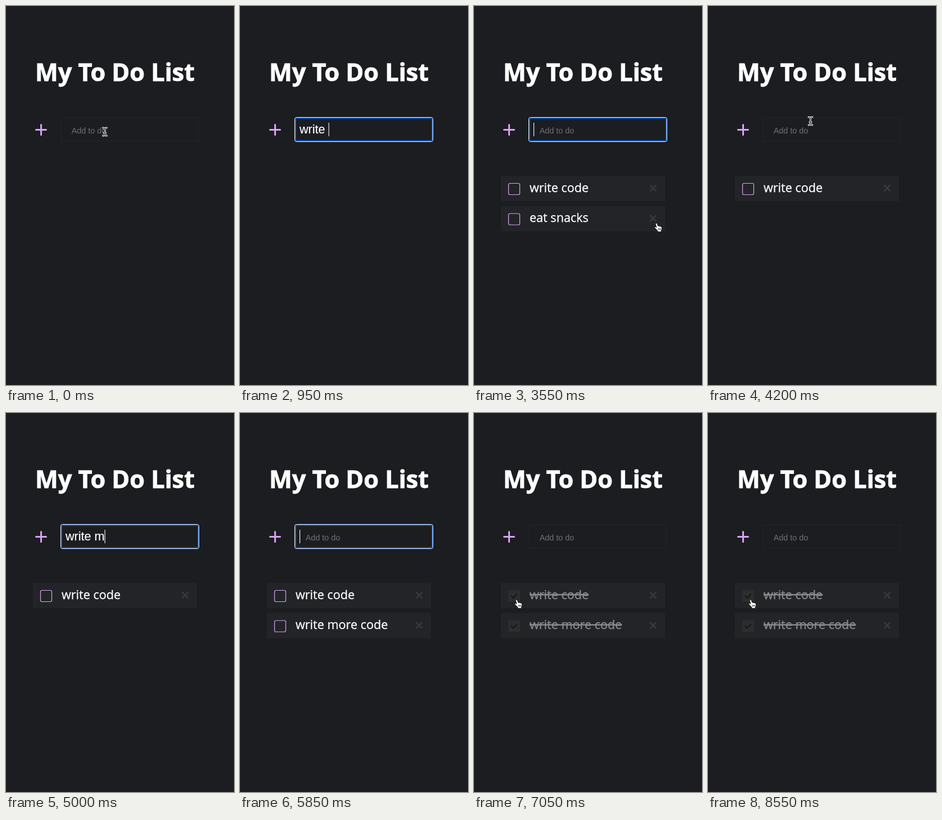
An HTML page for the animation above (8.75 s loop, 406 by 672 pixels).

```html
<!DOCTYPE html>
<html lang="en">
<head>
<meta charset="utf-8">
<title>To do list</title>
<style>
  html, body { margin: 0; width: 100%; height: 100%; overflow: hidden; background: #1c1d20; }
  svg { display: block; width: 406px; height: 672px; }
  text { white-space: pre; fill: #fff; }
  .title { font: 700 43.2px "Open Sans", sans-serif; text-anchor: middle; stroke: #fff; stroke-width: .9; }
  .label { font: 400 21.6px "Open Sans", sans-serif; stroke: #fff; stroke-width: .3; }
  .typed { font: 400 21.6px "Liberation Sans", Arial, sans-serif; stroke: #fff; stroke-width: .2; }
  .hint { font: 400 14.4px "Liberation Sans", Arial, sans-serif; fill: #707072; }
  .done .label { fill: #8b8b8d; stroke: #8b8b8d; text-decoration: line-through; text-decoration-thickness: 1.6px; }
  .line { fill: none; stroke-linecap: round; stroke-linejoin: round; }
</style>
</head>
<body>
<svg viewBox="0 0 406 672">
  <defs>
    <g id="row">
      <rect x="48" width="292" height="45" fill="#232427"/>
      <path d="M313.5 16.5l11 11m0 -11l-11 11" stroke="#38393c" stroke-width="2.5"/>
    </g>
    <rect id="open" x="61.5" y="13.5" width="20" height="20" rx="2.5" fill="none" stroke="#d9a3f7" stroke-width="1.2"/>
    <g id="checked">
      <rect x="61" y="13" width="21" height="21" rx="2.5" fill="#2c2d2d"/>
      <path class="line" d="M66.5 23.5l3.5 3.5 6.5 -7" stroke="#151617" stroke-width="2"/>
    </g>
    <path id="beam" class="line" d="M-3.4 -7Q0 -7 0 -4.6Q0 -7 3.4 -7M0 -4.6V4.6M-3.4 7Q0 7 0 4.6Q0 7 3.4 7M-1.6 2H1.6"/>
  </defs>

  <rect width="406" height="672" fill="#1c1d20"/>
  <text class="title" x="194" y="133">My To Do List</text>
  <path class="line" d="M53.5 219.5H71.5M62.5 210.5V228.5" stroke="#d9a3f7" stroke-width="3"/>
  <rect x="98.5" y="198.5" width="244" height="41" fill="none" stroke="#242528"/>
  <g id="ring" fill="none">
    <rect x="97.5" y="197.5" width="246" height="43" rx="3" stroke="#fff"/>
    <rect x="99" y="199" width="243" height="40" rx="2" stroke="#0b57c8" stroke-width="2"/>
  </g>
  <text class="hint" id="hint" x="116.7" y="226">Add to do</text>
  <text class="typed" id="typed" x="106" y="226"></text>
  <rect id="caret" y="207" width="1.1" height="24" fill="#fff"/>
  <g id="list"></g>
  <g id="pointer">
    <g id="text-pointer">
      <use href="#beam" stroke="#fff" stroke-width="2.8"/>
      <use href="#beam" stroke="#111" stroke-width="1"/>
    </g>
    <path id="hand-pointer" d="M-1.8 1.2Q-1.2 -.6 .6 .3Q1.4 .8 2.6 5.2Q4.2 4.2 5 5.6Q6.5 4.8 7.2 6.2Q9.4 5.6 9.5 8.2Q9.8 11 8.4 13V15.2H2V13.6Q.3 12 -2.8 8.6Q-4 6.9 -2.6 6.4Q-1.4 6.2 0 7.8Z
      M3.2 9.3V12.2M5.1 9.1V12.2M7 9V12.2" fill="#fff" stroke="#111" stroke-width=".9" stroke-linejoin="round"/>
    <path id="arrow-pointer" d="M0 0V14.5L3.4 11.3 5.6 16.3 8.2 15.2 6 10.4H10.6Z" fill="#111" stroke="#fff" stroke-width="1.1" stroke-linejoin="round"/>
  </g>
</svg>
<script>
  const LOOP = 8750, STEP = 50, PITCH = 53.5;
  const $ = id => document.getElementById(id);
  const show = (id, on) => { $(id).style.display = on ? "" : "none"; };

  // Keys are pressed at an even pace from the first to the last character.
  const entries = [
    { text: "write code", first: 400, last: 1300, enter: 1450, finished: 6350 },
    { text: "eat snacks", first: 1800, last: 2950, enter: 3150, removed: 3700 },
    { text: "write more code", first: 4500, last: 5650, enter: 5850, finished: 7000 },
  ];
  const focusSpans = [{ from: 50, to: 3700 }, { from: 4300, to: 6350 }];

  const spots = {
    rest: { x: 176, y: 223 },
    input: { x: 182.5, y: 204 },
    remove: { x: 325, y: 385 },
    aside: { x: 393, y: 398 },
    upperBox: { x: 76, y: 331 },
    lowerBox: { x: 76, y: 383 },
  };
  // The pointer shows during each stroke and eases from spot to spot.
  const strokes = [
    { from: 0, to: 150, origin: "rest", moves: [] },
    { from: 3350, to: 4500, origin: "rest", moves: [
      { from: 3350, to: 3550, spot: "remove" },
      { from: 3700, to: 3850, spot: "aside" },
      { from: 3850, to: 4200, spot: "input" },
    ] },
    { from: 5900, to: LOOP, origin: "input", moves: [
      { from: 5900, to: 6250, spot: "upperBox" },
      { from: 6400, to: 6550, spot: "lowerBox" },
      { from: 6700, to: 6900, spot: "upperBox" },
    ] },
  ];

  const during = (t, span) => t >= span.from && t < span.to;

  function progress(t, { from, to }) {
    const k = Math.min(1, Math.max(0, (t - from) / (to - from)));
    return k * k * (3 - 2 * k);
  }

  function pointerAt(t, { origin, moves }) {
    return moves.reduce((p, move) => {
      const k = progress(t, move), goal = spots[move.spot];
      return { x: p.x + (goal.x - p.x) * k, y: p.y + (goal.y - p.y) * k };
    }, spots[origin]);
  }

  function pointerKind({ x, y }) {
    if (x > 97 && x < 344 && y > 197 && y < 241) return "text";
    const overControl = (x > 60 && x < 83) || (x > 309 && x < 329);
    return overControl && y > 300 && y < 405 ? "hand" : "arrow";
  }

  function row(text, y, done) {
    return `<g class="${done ? "done" : ""}" transform="translate(0 ${y})"><use href="#row"/>
      <use href="#${done ? "checked" : "open"}"/>
      <text class="label" x="99" y="28.8">${text}</text></g>`;
  }

  let listMarkup = "";
  function drawList(t) {
    const live = entries.filter(e => t >= e.enter && !(t >= e.removed));
    const done = live.filter(e => t >= e.finished);
    const todo = live.filter(e => !done.includes(e));
    const gap = todo.length ? 9 : 0;
    const markup = [...todo, ...done].map((e, i) => {
      const isDone = done.includes(e);
      return row(e.text, 301 + PITCH * i + (isDone ? gap : 0), isDone);
    }).join("");
    if (markup !== listMarkup) $("list").innerHTML = listMarkup = markup;
  }

  function typedText(t) {
    const entry = entries.find(e => t >= e.first && t < e.enter);
    if (!entry) return "";
    const { text, first, last } = entry;
    const pace = (last - first) / (text.length - 1);
    return text.slice(0, 1 + Math.floor((t - first) / pace));
  }

  function drawInput(t) {
    const text = typedText(t);
    const focused = focusSpans.some(span => during(t, span));
    $("typed").textContent = text.replaceAll(" ", "\u00a0");
    $("caret").setAttribute("x", 106 + (text ? $("typed").getComputedTextLength() : 0));
    show("hint", !text);
    show("ring", focused);
    show("caret", focused);
  }

  function drawPointer(t) {
    const stroke = strokes.find(s => during(t, s));
    show("pointer", stroke);
    if (!stroke) return;
    const point = pointerAt(t, stroke);
    const kind = pointerKind(point);
    $("pointer").setAttribute("transform", `translate(${point.x} ${point.y})`);
    for (const name of ["text", "hand", "arrow"]) show(name + "-pointer", name === kind);
  }

  const start = performance.now();
  function draw() {
    const t = Math.floor((performance.now() - start) % LOOP / STEP) * STEP;
    drawList(t);
    drawInput(t);
    drawPointer(t);
    requestAnimationFrame(draw);
  }
  draw();
</script>
</body>
</html>
```
